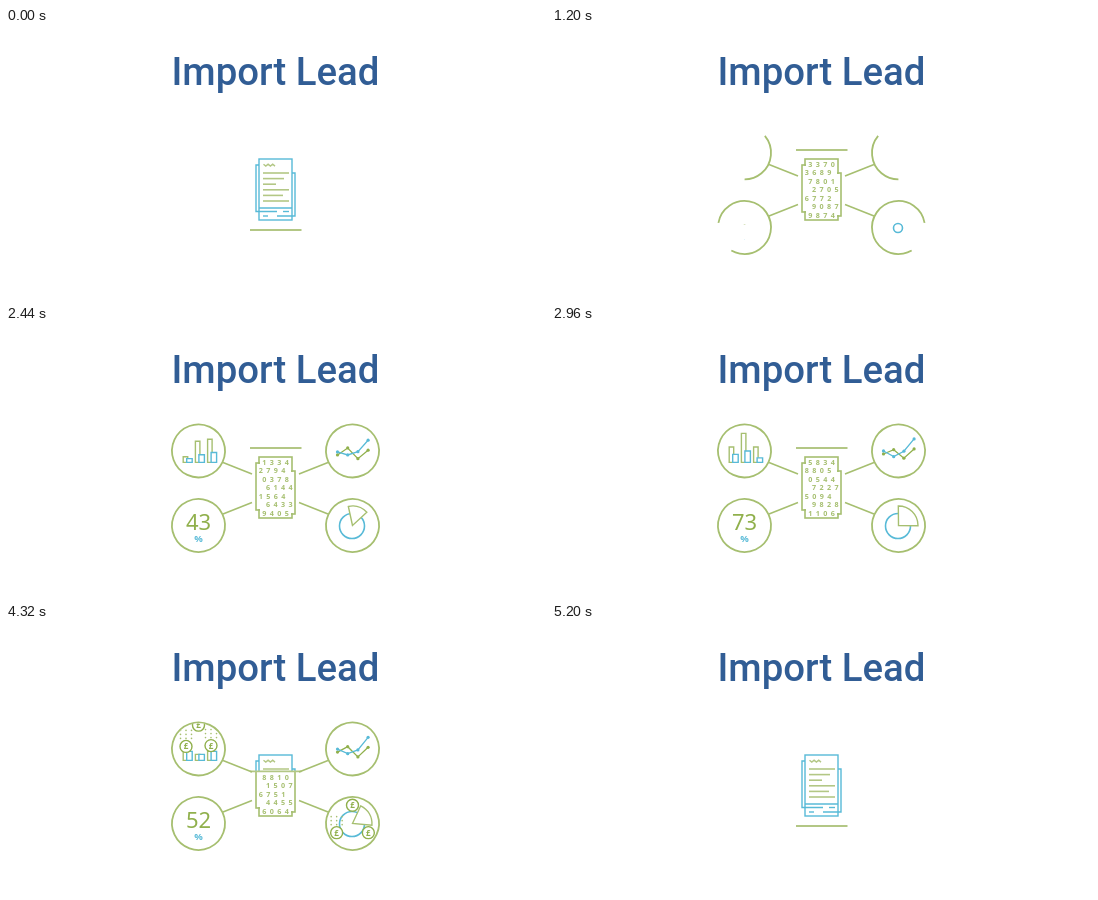
Animation, 540 px wide and 270 px high, one loop 5800 ms. Source, as an HTML page with a canvas:

```html
<!DOCTYPE html>
<html lang="en">
<head>
<meta charset="utf-8">
<title>Import Lead</title>
<style>
  html, body { margin: 0; width: 100%; height: 100%; overflow: hidden; background: #fff; }
  h1 { position: absolute; left: 0; top: 0; width: 539px; margin: 0; text-align: center;
       font: 500 38.3px/87px Roboto, sans-serif; color: #315d95; }
  canvas { position: absolute; left: 0; top: 0; }
</style>
</head>
<body>
<h1>Import Lead</h1>
<canvas id="stage" width="540" height="270"></canvas>
<script>
const ctx = document.getElementById('stage').getContext('2d');
const LOOP = 5800, STEP = 40;
const GREEN = '#a6bf70', DARK_GREEN = '#90b04c', PALE_GREEN = '#b3c785', BLUE = '#58bad7';
const TAU = Math.PI * 2, RAD = Math.PI / 180, RADIUS = 26.5;

const ramp = (t, a, b) => Math.min(1, Math.max(0, (t - a) / (b - a)));
const mix = (a, b, p) => a + (b - a) * p;
const random = n => { const v = Math.sin(n * 12.9898) * 43758.5453; return v - Math.floor(v); };

function stroke(color, width) {
  ctx.strokeStyle = color;
  ctx.lineWidth = width;
  ctx.stroke();
}

function poly(points, color, width = 1.4) {
  ctx.beginPath();
  points.forEach(([x, y]) => ctx.lineTo(x, y));
  stroke(color, width);
}
const hline = (x1, x2, y, color, width) => poly([[x1, y], [x2, y]], color, width);

function circle(x, y, r, color, fill, width = 1.4) {
  ctx.beginPath();
  ctx.arc(x, y, r, 0, TAU);
  if (fill) { ctx.fillStyle = fill; ctx.fill(); }
  if (color) stroke(color, width);
}

function box(x, y, w, h, color) {
  ctx.beginPath();
  ctx.rect(x, y, w, h);
  ctx.fillStyle = '#fff';
  ctx.fill();
  stroke(color, 1.4);
}

function label(text, x, y, font, color) {
  ctx.font = font + ' "Noto Sans", sans-serif';
  ctx.textAlign = 'center';
  ctx.fillStyle = color;
  ctx.fillText(text, x, y);
}

function scaled(x, y, size, paint) {
  ctx.save();
  ctx.translate(x, y);
  ctx.scale(size, size);
  paint();
  ctx.restore();
}

function within(y, h, paint) {
  ctx.save();
  ctx.beginPath();
  ctx.rect(0, y, 540, h);
  ctx.clip();
  paint();
  ctx.restore();
}

function paper() {
  poly([[253, 137], [250, 137], [250, 183.5], [271, 183.5]], BLUE);
  poly([[286, 145], [289, 145], [289, 188], [271, 188]], BLUE);
  ctx.strokeRect(253, 131, 33, 61);
  hline(253, 286, 180, BLUE);
  hline(277, 283, 183.5, BLUE);
  hline(257, 262, 188, BLUE);
  poly(Array.from({ length: 6 }, (_, i) => [257.5 + i * 2.3, 136.2 + i % 2 * 1.9]), PALE_GREEN);
  [26, 21, 13, 26, 20, 26].forEach((w, i) => hline(257, 257 + w, 145 + i * 5.6, PALE_GREEN, 1.6));
}

function numbers(t) {
  // Stroking all pages before clearing their insides leaves the joint outline.
  const pages = [[250, 137, 21, 47], [265, 145, 24, 43], [253, 131, 33, 61]];
  ctx.strokeStyle = GREEN;
  ctx.lineWidth = 1.6;
  pages.forEach(page => ctx.strokeRect(...page));
  pages.forEach(([x, y, w, h]) => ctx.clearRect(x + .8, y + .8, w - 1.6, h - 1.6));

  const tick = Math.floor(t / 80);
  [0, -1, 0, 1, -1, 1, 0].forEach((shift, row) => {
    for (let col = 0; col < 4; col++) {
      const digit = Math.floor(random(tick * 28 + row * 4 + col + 1) * 10);
      label(digit, 258.4 + shift * 3.6 + col * 7.5, 138.8 + row * 8.5, '600 7.2px', GREEN);
    }
  });
}

function bars(t) {
  const width = ramp(t, 1800, 1920), grow = ramp(t, 1940, 2500);
  const shift = ramp(t, 2960, 3800), settle = ramp(t, 3850, 4250);
  const angle = (t - 2960) / 840 * Math.PI / 2;
  if (!width) return;
  for (let i = 0; i < 3; i++) {
    const x = -15.3 + i * 12.2, rest = 9 - i % 2 * 3;
    const green = 17 + mix(12, 4, shift) * Math.cos(angle + (i - 1) * 1.7);
    const blue = mix(8, 12, shift) + mix(4, 8, shift) * Math.sin(2 * angle + i * TAU / 3);
    const bar = (dx, w, h, color) => {
      const height = mix(h * grow, rest, settle);
      box(x + dx, 11.5 - height, w, height, color);
    };
    if (grow) bar(0, 4.5, green, GREEN);
    bar(3.5, 5.5 * width, blue, BLUE);
  }
}

function lines(t) {
  const plot = (heights, color) => {
    const points = heights.map((y, i) => [-15 + i * 10.2, y + Math.sin(t / 260 + i * 2)]);
    poly(points, color, 1.3);
    points.forEach(([x, y]) => circle(x, y, 1.6, null, color));
  };
  scaled(0, 0, ramp(t, 1880, 2120), () => {
    plot([4, -2, 7, -1], DARK_GREEN);
    plot([1, 5, 0, -11], BLUE);
  });
}

function percent(t) {
  const size = ramp(t, 1180, 1480);
  const count = Math.round(73 * ramp(t, 1715, 2960) - 21 * ramp(t, 3000, 3830));
  scaled(0, -3.5, size, () =>
    label(String(count).padStart(2, '0'), 0, 7.8, '500 22px', DARK_GREEN));
  scaled(0, 12.5, size, () => label('%', 0, 3.8, '600 9.5px', BLUE));
}

function pie(t) {
  circle(-.5, .5, 12.5 * ramp(t, 1110, 1360), BLUE, null, 1.6);
  const reach = 19.5 * ramp(t, 1800, 1920);
  if (!reach) return;
  const middle = -100 + 55 * ramp(t, 1920, 2960) + 15 * ramp(t, 2960, 4320);
  const half = 27 + 20 * Math.cos((t - 2850) / 1800 * TAU);
  ctx.beginPath();
  ctx.moveTo(0, 0);
  ctx.arc(0, 0, reach, (middle - half) * RAD, (middle + half) * RAD);
  ctx.closePath();
  ctx.fillStyle = '#fff';
  ctx.fill();
  stroke(GREEN, 1.4);
}

function coin(t, x, y, start, end) {
  const fall = ramp(t, start, start + 240), size = 1 - ramp(t, end - 100, end);
  if (!fall || !size) return;
  const height = mix(-34, y, fall * fall);
  if (t < start + 360)
    for (let i = 0; i < 9; i++)
      circle(x + (i % 3 - 1) * 5.5, height - 8 - Math.floor(i / 3) * 4, .8, null, GREEN);
  scaled(x, height, size, () => {
    circle(0, 0, 6, DARK_GREEN, '#fff');
    label('£', 0, 2.9, '600 8px', DARK_GREEN);
  });
}

// Landing places: left, right, then middle; or evenly around the pie.
const inRow = (gap, y) => [-gap, gap, 0].map(x => [x, y]);
const around = r => [-90, 30, 150].map(a => [r * Math.cos(a * RAD), r * Math.sin(a * RAD)]);

const bubbles = [
  { side: -1, row: -1, icon: bars, coins: inRow(12.5, -2.5), rain: 3983, clear: 4640 },
  { side: 1, row: -1, icon: lines, coins: [[.5, -.5]], rain: 3540, clear: 4080 },
  { side: -1, row: 1, icon: percent, coins: inRow(14.5, 18), rain: 3080, clear: 3640 },
  { side: 1, row: 1, icon: pie, coins: around(18.3), rain: 3840, clear: 4640 }
];

function bubble(t, { side, row, icon, coins, rain, clear }, index) {
  const start = row > 0 ? 838 : 1038, pop = 4730 + index * 50;
  const open = ramp(t, start, start + 450), burst = ramp(t, pop, pop + 300);
  const link = ramp(t, start - 160, start) * (1 - ramp(t, pop, pop + 160));
  const size = 1 - ramp(t, pop - 120, pop + 40);
  ctx.save();
  ctx.translate(269.5 + side * 77, 162.2 + row * 37.3);

  ctx.save();
  ctx.scale(-side, 1);
  if (link) poly([[53.5, -23 * row], [53.5 - 29 * link, (11.5 * link - 23) * row]], GREEN, 1.6);
  if (open && burst < 1) {
    const r = RADIUS + 12 * burst, dash = TAU * r / 18, middle = -25 * row * RAD;
    if (burst) ctx.setLineDash([dash * (1 - burst), dash * burst]);
    ctx.beginPath();
    ctx.arc(0, 0, r, middle - Math.PI * open, middle + Math.PI * open);
    stroke(GREEN, 1.8);
  }
  ctx.restore();

  ctx.beginPath();
  ctx.arc(0, 0, RADIUS - .8, 0, TAU);
  ctx.clip();
  scaled(0, 0, size, () => {
    icon(t);
    coins.forEach(([x, y], i) => coin(t, x, y, rain + i * 100, clear));
  });
  ctx.restore();
}

function draw(t) {
  ctx.clearRect(0, 0, 540, 270);
  const scan = 202 - 80 * (ramp(t, 0, 1180) - ramp(t, 3945, 5125));
  within(0, scan, paper);
  within(scan, 270 - scan, () => numbers(t));
  hline(244, 295.5, scan, PALE_GREEN, 1.9);
  bubbles.forEach((b, i) => bubble(t, b, i));
}

function frame() {
  draw(Math.floor(performance.now() % LOOP / STEP) * STEP);
  requestAnimationFrame(frame);
}
frame();
</script>
</body>
</html>
```
